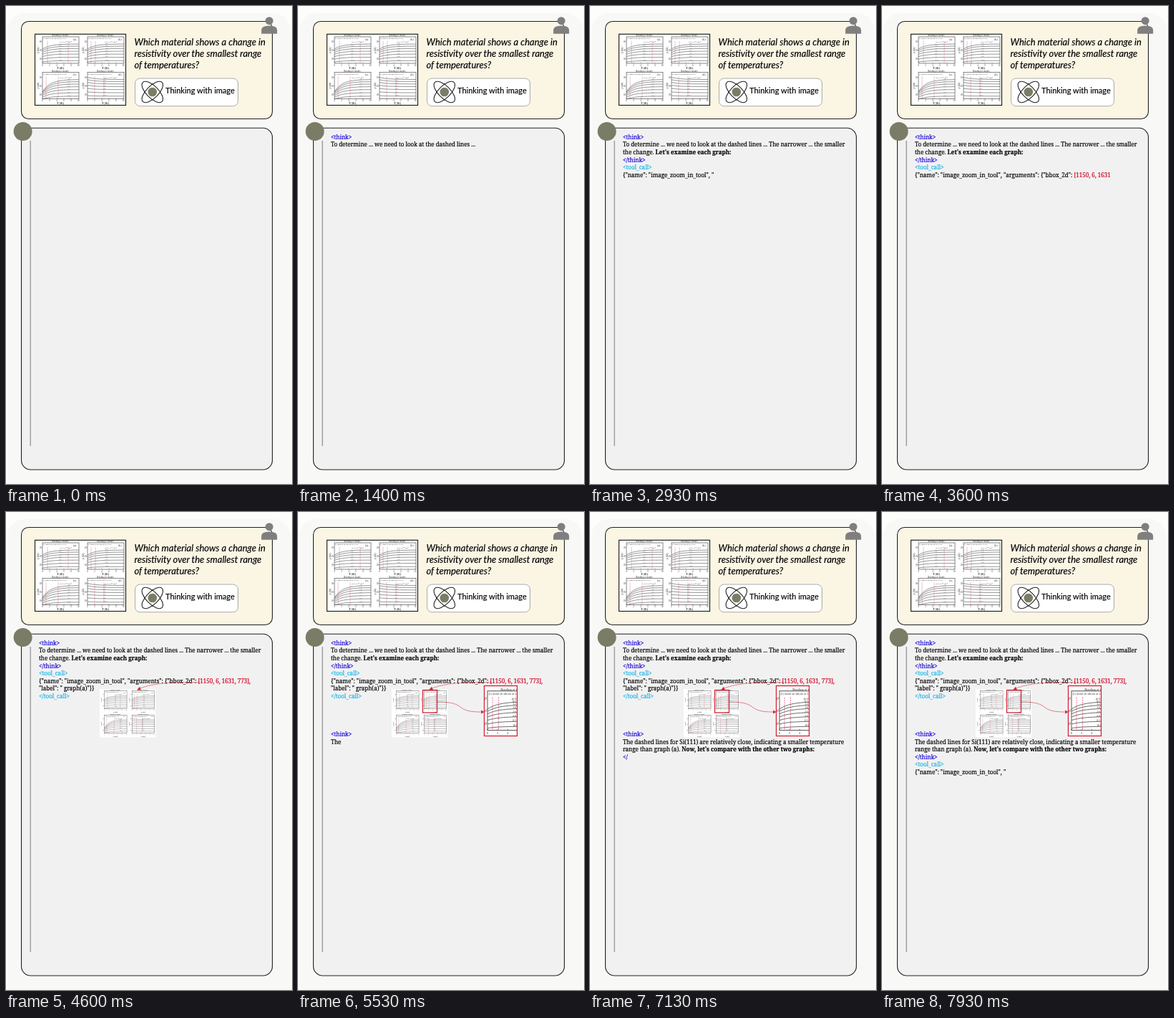
Animation, 400 px wide and 667 px high, one loop 8 s. Source, as an HTML page:

```html
<!DOCTYPE html>
<html lang="en">
<head>
<meta charset="utf-8">
<title>Thinking with image</title>
<style>
  html, body { margin: 0; width: 100%; height: 100%; overflow: hidden; background: #fdfdfb; }
  #stage { position: absolute; left: 0; top: 0; width: 400px; height: 667px; overflow: hidden; }
  svg { position: absolute; left: 0; top: 0; }
  .ask { font: italic 13px Lato, sans-serif; }
  .mode { font: 11px Lato, sans-serif; }
  .ask, .mode { fill: #000; stroke: #000; stroke-width: .15px; }
  .plot text { font-family: "Liberation Serif", serif; fill: #333; }
  #log { position: absolute; left: 46px; top: 177.8px; white-space: pre; color: #000;
         font: 8px/10.6px "Noto Serif", serif; -webkit-text-stroke: .18px; }
  .think { color: #1405dc; }
  .tool { color: #12b4ea; }
  .box { color: #d00022; }
  .bold { font-weight: bold; }
</style>
</head>
<body>
<div id="stage">
  <svg width="400" height="667">
    <defs>
      <g id="thumb" class="plot"></g>
      <clipPath id="crop"><rect x="260.5" y="242.5" width="46" height="70"/></clipPath>
    </defs>
    <rect x="2" y="10" width="396" height="680" rx="24" fill="#f8f8f6"/>
    <g stroke="#222" stroke-width="1.1">
      <rect x="21.5" y="21.5" width="351" height="136" rx="10" fill="#fbf5e4"/>
      <rect x="21.5" y="170.3" width="351" height="476.7" rx="13" fill="#f2f1f1"/>
    </g>
    <g fill="#7f7f7f">
      <circle cx="368.2" cy="20.7" r="5.5"/>
      <path d="M357.2 38.8V33.4Q357.2 27.4 368.2 27.4T379.2 33.4V38.8Z"/>
    </g>
    <use href="#thumb" x="40" y="39"/>
    <rect x="40.5" y="39.3" width="127" height="99.2" fill="none" stroke="#222" stroke-width="1.2"/>
    <g class="ask">
      <text x="179.5" y="54.7">Which material shows a change in</text>
      <text x="179.5" y="70.7">resistivity over the smallest range</text>
      <text x="179.5" y="86.7">of temperatures?</text>
    </g>
    <rect x="180.5" y="101" width="144" height="38.7" rx="7" fill="#fff" stroke="#aaa"/>
    <g fill="none" stroke="#222" stroke-width="1.1">
      <ellipse cx="204.8" cy="120" rx="19" ry="8.4" transform="rotate(45 204.8 120)"/>
      <ellipse cx="204.8" cy="120" rx="19" ry="8.4" transform="rotate(-45 204.8 120)"/>
    </g>
    <circle cx="204.8" cy="120" r="6.3" fill="#7b7c66"/>
    <text class="mode" x="223" y="122.3">Thinking with image</text>
    <path d="M34.2 188V614" stroke="#9a9a9a" stroke-width="1.4"/>
    <circle cx="23.6" cy="175" r="13" fill="#7b7c66"/>
  </svg>
  <div id="log"></div>
  <svg width="400" height="667" fill="none" stroke="#d62236">
    <g id="input">
      <use href="#thumb" transform="translate(131 247) scale(.614 .677)" stroke="none"/>
      <path d="M271 238C240 236.5 208 238 188 246" stroke-dasharray="1.2 1"/>
      <path d="M183 248.6L187 243.8L189 248.2Z" fill="#d62236" stroke="none"/>
    </g>
    <g id="zoom">
      <rect x="174.5" y="248.5" width="20" height="31.5" stroke-width="1.3"/>
      <path d="M195 265C238 265 217 279 256 279" stroke-dasharray="1.2 1"/>
      <path d="M260.5 279L256 276.5V281.5Z" fill="#d62236" stroke="none"/>
      <g clip-path="url(#crop)">
        <use href="#thumb" transform="translate(160.7 243.8) scale(1.41 1.483)" stroke="none"/>
      </g>
      <rect x="260.5" y="242.5" width="46" height="70" stroke-width="1.3"/>
    </g>
  </svg>
</div>
<script>
const $ = id => document.getElementById(id);

const label = (x, y, size, text, extra = "") =>
  `<text x="${x}" y="${y}" font-size="${size}" ${extra}>${text}</text>`;

// One resistivity plot: seven curves settling from a start offset to a level
function panel(x, y, tag, rise, labelX, dashes) {
  const values = ["0.5", "1.2", "1.8", "2.6", "4.0", "6.5", "10.0"];
  let out = `<rect x="${x}" y="${y}" width="51" height="37" fill="none" stroke="#555" stroke-width=".7"/>`;
  values.forEach((value, i) => {
    const level = 10 + 2.8 * i + .18 * i * i;
    const curve = u => y + level + rise * (1 - i / 8) * Math.exp(-u / 11);
    let d = "";
    for (let u = 0; u <= 51; u += 3) d += `${u ? "L" : "M"}${x + u} ${curve(u).toFixed(2)}`;
    out += `<path d="${d}" fill="none" stroke="#555" stroke-width=".6"/>` +
      label(x + labelX, curve(labelX) - .3, 2.7, value);
  });
  for (const u of dashes)
    out += `<path d="M${x + u} ${y + 6}v31" stroke="#d0607a" stroke-width=".6" stroke-dasharray="1.4 .8"/>`;
  for (let i = 0; i < 6; i++) {
    out += `<path d="M${x + i * 10} ${y + 37}v-1.2" stroke="#444" stroke-width=".5"/>` +
      label(x + i * 10, y + 40.6, 3, i * 2, 'text-anchor="middle"');
    if (i % 2) out += label(x - 4.5, y + 2 + i * 6, 3, `10${"³²¹"[i >> 1]}`);
  }
  return out + label(x + 13, y - .8, 3.2, "Bending of metals") +
    label(x + 1, y + 3.4, 2.9, "(1) metal on silicon at 2.0 K") +
    label(x + 43, y + 4.6, 4, `(${tag})`) +
    label(x + 24, y + 8.2, 2.9, "d=2×10¹⁵ cm⁻²") +
    label(x + 20, y + 44.8, 4.3, "T (K)", 'font-weight="bold"') +
    label(0, 0, 4, "ρ (Ω)", `transform="translate(${x - 5.5} ${y + 23})rotate(-90)"`);
}

$("thumb").innerHTML = `<rect width="127.5" height="99.5" fill="#fff"/>` +
  panel(11, 4, "a", 7, 23, [7, 36]) +
  panel(74, 4, "b", 7, 25, [5, 11]) +
  panel(11, 53.5, "c", 17, 35, [5, 22]) +
  panel(74, 53.5, "d", -3, 22, [10, 23]);

// Bursts of streamed tokens: first tick, last tick, then [style, text] runs
const bursts = [
  [7, 14, ["think", "<think>"], ["", "\nTo determine ... we need to look at the dashed lines ..."]],
  [14, 23, ["", " The narrower ... the smaller\nthe change."], ["bold", " Let's examine each graph:"],
    ["think", "\n</think>"], ["tool", "\n<tool_call"]],
  [23, 36, ["tool", ">"], ["", '\n{"name": "image_zoom_in_tool", "arguments": {"bbox_2d":'],
    ["box", " [1150, 6, 1631"]],
  [36, 44, ["box", ", 773],"], ["", '\n"label": " graph(a)"}}'], ["tool", "\n</tool_call>"]],
  [53, 64, ["think", "\n\n\n\n\n<think>"],
    ["", "\nThe dashed lines for Si(111) are relatively close, indicating a smaller temperature\nrange than graph ("]],
  [64, 79, ["", "a)."], ["bold", " Now, let's compare with the other two graphs:"],
    ["think", "\n</think>"], ["tool", "\n<tool_call>"], ["", '\n{"name": "image_zoom_in_tool", "']]
];

const parts = [{ el: $("input"), from: 45 }, { el: $("zoom"), from: 49 }];
for (const [start, end, ...runs] of bursts) {
  const tokens = runs.flatMap(([style, text]) =>
    text.match(/\n* ?(?:_?[A-Za-z']+|\d+|[^\sA-Za-z\d]+)/g).map(token => [style, token]));
  tokens.forEach(([style, token], i) => {
    const el = document.createElement("span");
    el.className = style;
    el.textContent = token;
    $("log").append(el);
    parts.push({ el, from: start + (end - start) * ((i + 1) / tokens.length) });
  });
}

// Ticks alternate between 130 ms and 70 ms
function draw() {
  const t = performance.now() % 8000;
  const tick = 2 * Math.floor(t / 200) + (t % 200 >= 130 ? 1 : 0);
  for (const { el, from } of parts)
    el.style.visibility = tick >= from ? "visible" : "hidden";
  requestAnimationFrame(draw);
}
draw();
</script>
</body>
</html>
```
